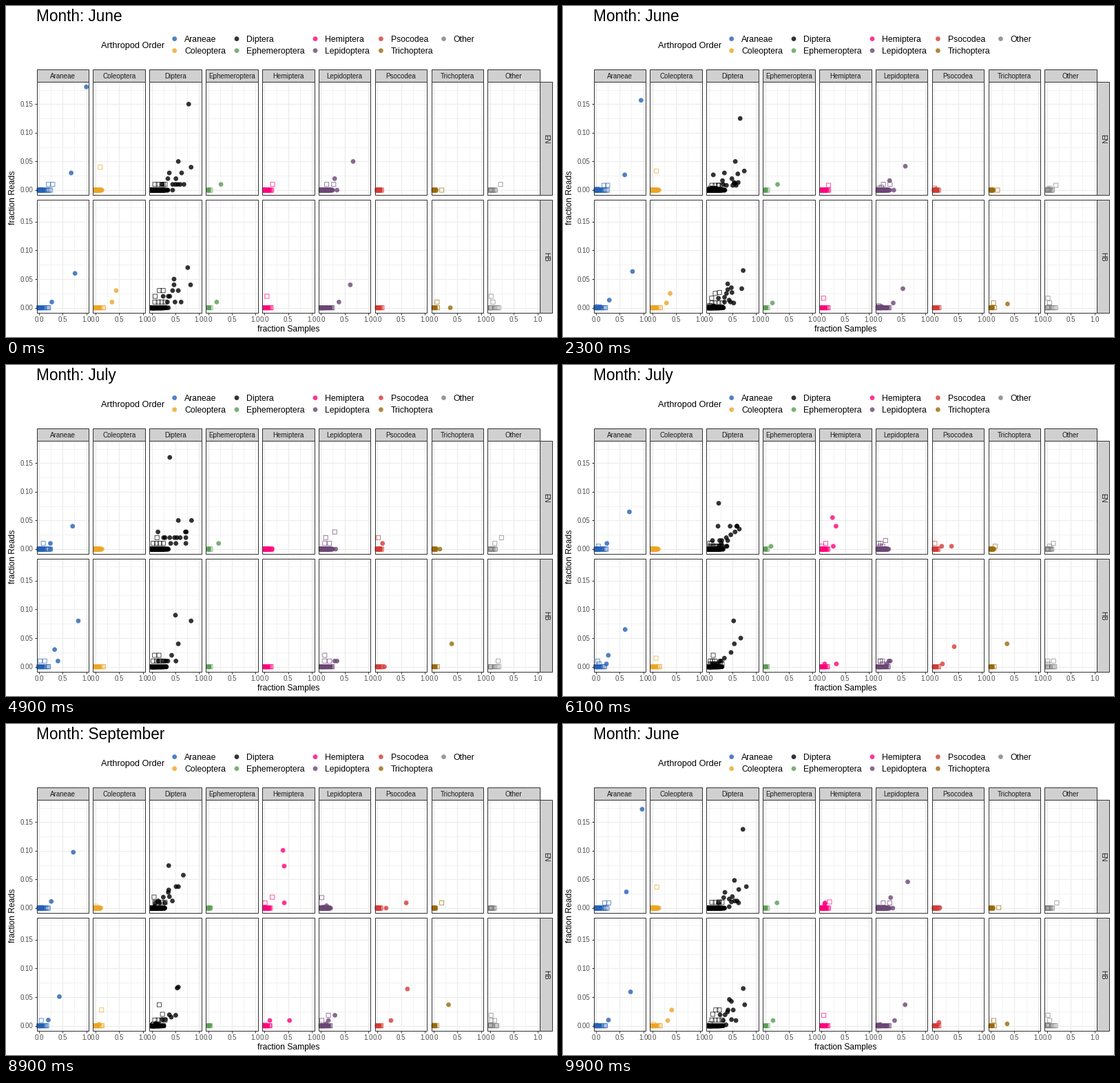
Recreate the animation shown at these times as a matplotlib script. Size 800 by 480 pixels, loop 10000 ms.

```python
import numpy as np
import matplotlib.pyplot as plt
from matplotlib.animation import FuncAnimation
from matplotlib.patches import Rectangle

W, H, DPI = 800, 480, 80
PT = 72 / DPI
FRAMES, INTERVAL = 100, 100
MONTHS = ["June", "July", "September"]
MOVES = [(21, 33), (55, 67), (88, 100)]

LEFT, STEP, PANEL_W = 44.5, 81.87, 75.6
TOPS, PANEL_H = (110.0, 280.6), 164.4
X0, XUNIT = 3.44, 68.7
Y0, YUNIT = 157.0, 831.4
GRID, EDGE, STRIP = "#ebebeb", "#333333", "#d0d0d0"

plt.rcParams["font.family"] = "Liberation Sans"

COLORS = {
    "Araneae": "#2661b5", "Coleoptera": "#eda525", "Diptera": "#000000",
    "Ephemeroptera": "#5a9d54", "Hemiptera": "#ff007c", "Lepidoptera": "#6b4675",
    "Psocodea": "#d43a36", "Trichoptera": "#9a6a08", "Other": "#808080",
}
NAMES, SITES = list(COLORS), ["EN", "HB"]
points = {"o": [], "s": []}
tints = {"o": [], "s": []}
O = None  # a month spent near the origin


def to_px(col, row, x, y):
    """Data in hundredths to stage pixels."""
    return (LEFT + STEP * col + X0 + XUNIT * x / 100,
            TOPS[row] + Y0 - YUNIT * y / 100)


def add(name, site, kind, *tracks):
    """Each track has one (x, y) per month."""
    for track in tracks:
        rest = (0.1 * np.mean([p[0] for p in track if p]), 0)
        points[kind].append([to_px(NAMES.index(name), SITES.index(site), *(p or rest))
                             for p in track])
        tints[kind].append(COLORS[name])


def cluster(name, n, *spans):
    """Points on the zero line, denser near the origin."""
    panels = [(s, k) for s in SITES for k in "os"]
    for (site, kind), span in zip(panels, spans):
        if span:
            for q in np.linspace(0, 1, n) ** 1.5:
                x = round(span * q)
                add(name, site, kind, ((x, 0), (x, 0), (round(0.8 * x), 0)))


def haze(name, site, kind, n, span):
    """A low row of points that alternate between 0 and 0.01."""
    for i, x in enumerate(np.linspace(3, span, n)):
        add(name, site, kind, [(x, (i + k) % 2) for k in range(3)])


cluster("Araneae", 13, 10, 24, 8, 20)
cluster("Coleoptera", 11, 14, 9, 8, 17)
cluster("Diptera", 42, 34, 24, 31, 24)
cluster("Ephemeroptera", 3, 1, 5, 2, 5)
cluster("Hemiptera", 11, 11, 15, 8, 14)
cluster("Lepidoptera", 20, 25, 20, 20, 24)
cluster("Psocodea", 8, 5, 9, 5, 10)
cluster("Trichoptera", 4, 5, 4, 3, 8)
cluster("Other", 9, 0, 11, 0, 18)

add("Araneae", "EN", "o", ((100, 18), (71, 4), (70, 9)), ((68, 3), (24, 1), (22, 1)),
    (O, (24, 0), O))
add("Araneae", "EN", "s", ((20, 1), O, O), ((29, 1), O, O), (O, (9, 1), O))
add("Araneae", "HB", "o", ((76, 6), (83, 8), (40, 5)), ((27, 1), (33, 3), (19, 1)),
    (O, (40, 1), O))
add("Araneae", "HB", "s", (O, (2, 1), (5, 1)), (O, (12, 1), O))

add("Coleoptera", "EN", "s", ((10, 4), O, O))
add("Coleoptera", "HB", "o", ((44, 3), O, O), ((35, 1), O, O))
add("Coleoptera", "HB", "s", (O, O, (14, 3)))

add("Diptera", "EN", "o", ((78, 15), O, O), ((56, 5), (56, 5), (34, 3)),
    ((83, 4), (35, 0), (40, 1)), ((63, 3), (53, 2), (67, 6)), ((37, 3), (13, 3), O),
    ((51, 2), (38, 2), (36, 2)), ((34, 2), O, O), ((44, 1), O, (35, 8)),
    ((60, 1), (73, 3), (56, 4)), ((55, 1), (60, 2), (51, 4)),
    ((50, 1), (71, 3), (22, 2)), ((44, 0), (84, 5), (34, 3)), (O, (72, 2), (8, 1)),
    (O, (38, 16), O), (O, (48, 2), O), ((68, 1), O, O), ((22, 1), (72, 1), O),
    (O, (25, 2), (30, 1)), (O, (28, 2), (18, 1)), (O, (51, 1), O), (O, (40, 1), O))
add("Diptera", "EN", "s", ((24, 1), O, (3, 2)), (O, (11, 2), O))
add("Diptera", "HB", "o", ((76, 7), (56, 4), (38, 1)), ((82, 4), O, O),
    ((47, 5), O, O), ((47, 4), (51, 1), (57, 7)), ((38, 2), (50, 9), (55, 7)),
    ((44, 3), O, O), ((56, 3), (14, 1), O), ((24, 2), O, (22, 1)),
    ((35, 2), (25, 1), (28, 1)), ((33, 1), (34, 1), O), ((49, 1), (30, 1), (36, 2)),
    ((62, 1), O, O), ((35, 0), (83, 8), (52, 2)), (O, (42, 2), O))
add("Diptera", "HB", "s", ((16, 3), O, O), ((24, 3), (15, 1), O),
    ((7, 2), O, (24, 2)), (O, O, (17, 4)), (O, (6, 2), O), (O, (15, 2), O))
for site in SITES:
    haze("Diptera", site, "s", 8, 28)

add("Ephemeroptera", "EN", "o", ((27, 1), (22, 1), O))
add("Ephemeroptera", "HB", "o", ((18, 1), O, O))

add("Hemiptera", "EN", "o", (O, O, (42, 11)), (O, (16, 0), (45, 8)), (O, O, (45, 1)))
add("Hemiptera", "EN", "s", ((17, 1), O, (16, 2)), (O, O, (1, 1)))
add("Hemiptera", "HB", "o", (O, O, (57, 1)), (O, O, (12, 1)))
add("Hemiptera", "HB", "s", ((5, 2), O, O))

add("Lepidoptera", "EN", "o", ((68, 5), O, O), ((29, 2), O, O), ((34, 0), (31, 0), O))
add("Lepidoptera", "EN", "s", ((12, 1), (8, 1), O), ((27, 1), (18, 1), O),
    (O, (29, 3), O), (O, (10, 2), O), (O, O, (2, 2)))
add("Lepidoptera", "HB", "o", ((62, 4), O, O), ((38, 1), O, O),
    (O, (20, 0), (32, 2)), (O, (34, 1), O), (O, (29, 1), (17, 1)))
add("Lepidoptera", "HB", "s", (O, (8, 2), O), (O, (8, 1), (2, 1)),
    (O, (18, 1), O), (O, O, (17, 2)))

add("Psocodea", "EN", "o", (O, (11, 1), (20, 0)), (O, O, (66, 1)))
add("Psocodea", "EN", "s", (O, (2, 2), O))
add("Psocodea", "HB", "o", (O, (15, 0), (69, 7)), (O, O, (31, 1)))

add("Trichoptera", "EN", "o", (O, (13, 0), O))
add("Trichoptera", "EN", "s", ((17, 0), O, (17, 1)))
add("Trichoptera", "HB", "o", ((35, 0), (38, 4), (31, 4)))
add("Trichoptera", "HB", "s", ((7, 1), O, O))

add("Other", "EN", "s", ((22, 1), O, O), (O, (24, 2), O), (O, (10, 1), O))
add("Other", "HB", "s", ((2, 2), O, O), ((6, 1), O, O), (O, O, (3, 1)),
    (O, (17, 1), (10, 1)), (O, O, (2, 2)))

fig = plt.figure(figsize=(W / DPI, H / DPI), dpi=DPI, facecolor="white")
ax = fig.add_axes([0, 0, 1, 1])
ax.set(xlim=(0, W), ylim=(H, 0))
ax.axis("off")


def label(x, y, text, px, color="black", **kw):
    return ax.text(x, y, text, fontsize=px * PT, color=color, **kw)


def line(xs, ys, color, px, z):
    ax.plot(xs, ys, color=color, lw=px * PT, zorder=z, solid_capstyle="butt")


def box(x, y, w, h, fill, z=4):
    ax.add_patch(Rectangle((x, y), w, h, facecolor=fill, edgecolor=EDGE,
                           lw=PT, zorder=z))


def dots(kind, xy, colors):
    if kind == "o":
        style = dict(s=(6.8 * PT) ** 2, c=colors, linewidths=0)
    else:
        style = dict(s=(6.1 * PT) ** 2, facecolors="none", edgecolors=colors,
                     linewidths=0.85 * PT)
    art = ax.scatter(xy[:, 0], xy[:, 1], marker=kind, alpha=0.8, zorder=3, **style)
    art.set_snap(False)
    return art


def draw_panel(col, row):
    left, top = LEFT + STEP * col, TOPS[row]
    right, bottom = left + PANEL_W, top + PANEL_H
    for k in range(8):
        y = to_px(col, row, 0, 2.5 * k)[1]
        line([left, right], [y, y], GRID, 0.6 if k % 2 else 1.1, 1)
    for k in range(5):
        x = to_px(col, row, 25 * k, 0)[0]
        line([x, x], [top, bottom], GRID, 0.6 if k % 2 else 1.1, 1)
    box(left, top, PANEL_W, PANEL_H, "none")


for col, name in enumerate(NAMES):
    left = LEFT + STEP * col
    for row in (0, 1):
        draw_panel(col, row)
    box(left, 92, PANEL_W, 18, STRIP)
    label(left + PANEL_W / 2, 104.7, name, 9.9, "#1a1a1a", ha="center", zorder=5)
    for k in (0, 50, 100):
        x = to_px(col, 1, k, 0)[0]
        line([x, x], [445, 448], EDGE, 1, 4)
        label(x, 458.2, f"{k / 100:.1f}", 9.8, "#4d4d4d", ha="center")

for row, site in enumerate(SITES):
    box(LEFT + STEP * 8 + PANEL_W, TOPS[row], 18.4, PANEL_H, STRIP)
    label(784.5, TOPS[row] + PANEL_H / 2 + 0.5, site, 9.9, "#1a1a1a", rotation=270,
          ha="center", va="center", zorder=5)
    for k in (0, 5, 10, 15):
        y = to_px(0, row, 0, k)[1]
        line([41.5, LEFT], [y, y], EDGE, 1, 4)
        label(39.3, y + 3.5, f"{k / 100:.2f}", 9.8, "#4d4d4d", ha="right")

label(410, 472, "fraction Samples", 12.1, ha="center")
label(10.5, 278, "fraction Reads", 12.1, rotation=90, ha="center", va="center")
label(137.8, 61.3, "Arthropod Order", 12.7)
title = label(43.5, 22.3, "", 22.6)

keys = []
for i, name in enumerate(NAMES):
    x, y = (244.7, 335, 449, 544.4, 635.5)[i // 2], (47.6, 64.7)[i % 2]
    keys.append((x, y))
    label(x + 14.2, y + 4.6, name, 12.3)
dots("o", np.array(keys), list(COLORS.values()))

paths = {k: np.array(v) for k, v in points.items()}
layers = {k: dots(k, paths[k][:, 0], tints[k]) for k in "os"}


def pose(frame):
    """Current month index and progress towards the next one."""
    for k, (start, end) in enumerate(MOVES):
        if frame < end:
            return k, max(0, (frame - start) / (end - start))


def update(frame):
    k, t = pose(frame)
    nxt = (k + 1) % 3
    title.set_text("Month: " + MONTHS[nxt if t > 0.5 else k])
    for kind, art in layers.items():
        p = paths[kind]
        art.set_offsets(p[:, k] * (1 - t) + p[:, nxt] * t)
    return [title, *layers.values()]


anim = FuncAnimation(fig, update, frames=FRAMES, interval=INTERVAL,
                     init_func=lambda: update(0), repeat=True, repeat_delay=0)
plt.show()
```
